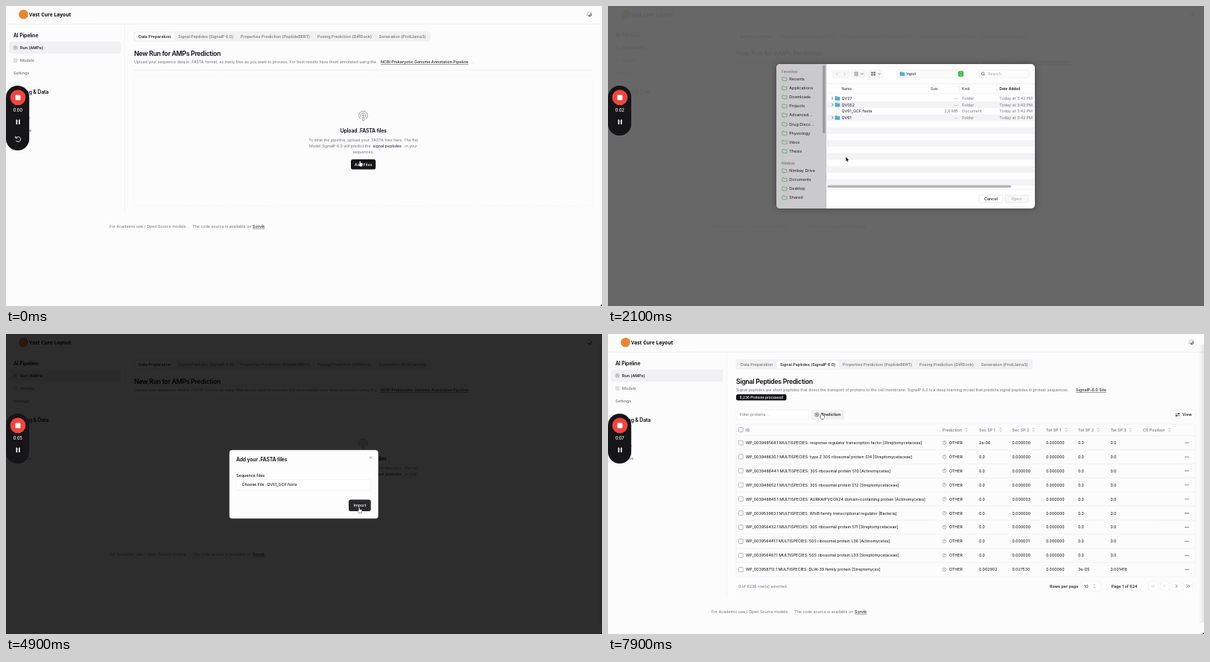
Recreate the animation shown at these times as an HTML page with a canvas. Size 800 by 403 pixels, loop 8000 ms.

```html
<!DOCTYPE html>
<html lang="en">
<head>
<meta charset="utf-8">
<title>Pipeline walkthrough</title>
<style>
html, body { margin: 0; width: 100%; height: 100%; overflow: hidden; background: #fdfcfd; }
canvas { display: block; width: 800px; height: 403px; }
</style>
</head>
<body>
<canvas id="stage"></canvas>
<script>
const W = 800, H = 403, LOOP = 8000;
const INK = '#0c0c0f', GRAY = '#71717a', LINE = '#e8e7ec', SOFT = '#f1f0f3', PAGE = '#fdfcfd';
const dpr = window.devicePixelRatio || 1;
const main = document.getElementById('stage');
const extra = document.createElement('canvas');
for (const c of [main, extra]) { c.width = W * dpr; c.height = H * dpr; }
const mainCtx = main.getContext('2d'), extraCtx = extra.getContext('2d');
let g = mainCtx;

const ramp = (t, a, b) => Math.min(1, Math.max(0, (t - a) / (b - a)));
const ease = p => p * p * (3 - 2 * p);

function text(s, x, y, color = INK, size = 5.3, weight = 400, align = 'left', spacing = 0, family = 'Inter') {
  g.font = `${weight} ${size}px ${family}, sans-serif`;
  g.letterSpacing = spacing + 'px';
  g.textAlign = align;
  g.fillStyle = color;
  g.fillText(s, x, y + size * 0.36);
  return g.measureText(s).width;
}
const medium = (s, x, y, color = INK, align = 'left') => text(s, x, y, color, 5.4, 500, align);
const heading = (s, x, y, align) => text(s, x, y, INK, 6.9, 600, align, -0.17);
function link(s, x, y) {
  const w = text(s, x, y, '#3f3f46', 5.3, 600);
  line([[x, y + 3.2], [x + w, y + 3.2]], '#3f3f46', 0.5);
}
function box(x, y, w, h, r, fill, stroke, lw = 0.5) {
  g.beginPath();
  g.roundRect(x, y, w, h, r);
  if (fill) { g.fillStyle = fill; g.fill(); }
  if (stroke) { g.strokeStyle = stroke; g.lineWidth = lw; g.stroke(); }
}
function line(pts, color = LINE, lw = 0.6) {
  g.beginPath();
  pts.forEach(([x, y]) => g.lineTo(x, y));
  g.strokeStyle = color;
  g.lineWidth = lw;
  g.stroke();
}
function arc(x, y, r, color, lw = 0.6, a = 0, b = Math.PI * 2) {
  g.beginPath();
  g.arc(x, y, r, a, b);
  g.strokeStyle = color;
  g.lineWidth = lw;
  g.stroke();
}
function disc(x, y, r, color) {
  g.beginPath();
  g.arc(x, y, r, 0, 7);
  g.fillStyle = color;
  g.fill();
}
function chevron(x, y, dx, dy, color, lw = 0.7) {
  line(dx ? [[x - dx, y - 2], [x + dx, y], [x - dx, y + 2]]
          : [[x - 1.5, y - dy], [x, y + dy], [x + 1.5, y - dy]], color, lw);
}
function sorter(x, y, color = GRAY) {
  chevron(x, y - 1.5, 0, -0.6, color, 0.5);
  chevron(x, y + 1.5, 0, 0.6, color, 0.5);
}
function layer(alpha, draw) {
  if (alpha <= 0) return;
  g = extraCtx;
  g.setTransform(dpr, 0, 0, dpr, 0, 0);
  g.clearRect(0, 0, W, H);
  draw();
  g = mainCtx;
  g.globalAlpha = alpha;
  g.drawImage(extra, 0, 0, W, H);
  g.globalAlpha = 1;
}
function veil(color, alpha) {
  if (alpha <= 0) return;
  g.globalAlpha = alpha;
  g.fillStyle = color;
  g.fillRect(0, 0, W, H);
  g.globalAlpha = 1;
}

const TABS = [
  ['Data Preparation', 178, 173, 226],
  ['Signal Peptides (SignalP 6.0)', 231, 226, 310],
  ['Properties Prediction (PeptideBERT)', 315],
  ['Posing Prediction (DiffDock)', 418],
  ['Generation (ProtLlama3)', 500.5]
];

function frameParts(t, tab) {
  g.fillStyle = PAGE;
  g.fillRect(0, 0, W, H);
  line([[0, 24.3], [W, 24.3]]);
  line([[159.3, 24], [159.3, tab ? 354 : 277]]);
  disc(23.5, 11.3, 6.3, '#e8862f');
  text('Vast Cure Layout', 31, 11.3, INK, 6.7, 600, 'left', 0, '"Noto Sans"');
  arc(783.5, 11.5, 2.3, INK, 0.8, -0.9, 2.6);
  arc(782, 10.5, 2.4, INK, 0.6, 0, 1.6);
  for (let a = 2.9; a < 5.4; a += 0.6)
    line([3, 3.9].map(r => [783.3 + r * Math.cos(a), 11.3 + r * Math.sin(a)]), INK, 0.6);

  heading('AI Pipeline', 10, 39.5);
  box(4, 48, 150.5, 16, 3, SOFT);
  arc(12.6, 56, 2.5, GRAY, 0.5);
  line([[11.9, 54.8], [13.9, 56], [11.9, 57.2], [11.9, 54.8]], GRAY, 0.5);
  medium('Run (AMPs)', 19, 56);
  box(10.2, 70.6, 5, 4.8, 0.5, '#e3e2e6', '#c9c8ce');
  medium('Models', 19, 73, GRAY);
  medium('Settings', 10, 90.3, GRAY);
  heading('Training & Data', 57, 116, 'right');
  medium('Datasets', 32, 150, GRAY, 'right');
  medium('Fine tune', 34.5, 167, GRAY, 'right');

  box(171.5, 34, 398.5, 14, 3, SOFT);
  TABS.forEach(([s, x, l, r], i) => {
    if (i === tab) box(l, 35.6, r - l, 10.8, 2.5, '#fff', '#e9e8ec', 0.3);
    medium(s, x, 41, i === tab ? INK : GRAY);
  });

  const fy = tab ? 373 : 296;
  text('For Academic use / Open Source models.', 139, fy, GRAY);
  text('The code source is available on', 250.3, fy, GRAY);
  link('Sorvik', 331, fy);
  if (t >= 600) {
    const sh = g.createLinearGradient(793, 0, 800, 0);
    sh.addColorStop(0, 'rgba(60,60,70,0)');
    sh.addColorStop(1, 'rgba(60,60,70,.12)');
    g.fillStyle = sh;
    g.fillRect(793, 14, 7, 374);
  }
  disc(799.5, 402.5, 1.3, '#333');
}

const title = s => text(s, 172, 63.5, INK, 8.75, 600, 'left', -0.3);

function uploadView(t) {
  title('New Run for AMPs Prediction');
  text('Upload your sequence data in .FASTA format, as many files as you want to process. For best results have them annotated using the', 172, 75.3, GRAY, 5.26);
  link('NCBI Prokaryotic Genome Annotation Pipeline', 503, 75.3);
  text('.', 626.3, 75.3, GRAY);
  line([[172, 86], [788, 86]], '#dfe0e6');
  g.setLineDash([1.2, 1.2]);
  box(171.5, 93, 616.5, 175.5, 3, null, '#ebeaef', 0.5);
  g.setLineDash([]);

  arc(479.5, 147, 5.8, GRAY, 0.7, 2.2, 7.22);
  arc(479.5, 147, 3.4, GRAY, 0.7, 2.4, 7.02);
  arc(479.5, 146.8, 1, GRAY, 0.7);
  box(478.4, 149.2, 2.2, 5, 1, null, GRAY, 0.7);
  heading('Upload .FASTA files', 479.7, 167.7, 'center');
  text('To strat the pipeline, upload your .FASTA files here. The fist', 479.6, 180.3, GRAY, 5.26, 400, 'center');
  text('Model SignalP 6.0 will predict the', 407, 188, GRAY, 5.26);
  text('signal peptides', 492.3, 188, '#52525b', 5.26, 600);
  text('in your', 552.3, 188, GRAY, 5.26, 400, 'right');
  text('sequences.', 479.6, 195.8, GRAY, 5.26, 400, 'center');
  const hover = t >= 200 && t < 1100;
  box(463, 206, 33.2, 13.6, 2.5, hover ? '#303033' : '#151518', t >= 5000 ? '#8fc08f' : null, 0.9);
  medium('Add Files', 479.6, 212.8, '#fafafa', 'center');
}

const COLS = [['Prediction', 449, 481], ['Sec SP 1', 498, 527], ['Sec SP 2', 542.5, 571], ['Tat SP 1', 588, 615],
  ['Tat SP 2', 631, 658], ['Tat SP 3', 674.5, 701], ['CS Position', 718, 753.5]];
const ROWS = [
  ['3948568.1', 'response regulator transcription factor [Streptomycetaceae]', '2e-06 0.000000 0.000000 0.0 0.0'],
  ['3948630.1', 'type Z 30S ribosomal protein S14 [Streptomycetaceae]', '0.0 0.000000 0.000000 0.0 0.0'],
  ['3948644.1', '30S ribosomal protein S10 [Actinomycetes]', '0.0 0.000000 0.000000 0.0 0.0'],
  ['3948652.1', '30S ribosomal protein S12 [Streptomycetaceae]', '0.0 0.000000 0.000000 0.0 0.0'],
  ['3948845.1', 'AURKAIP1/COX24 domain-containing protein [Actinomycetes]', '0.0 0.000003 0.000000 0.0 0.0'],
  ['3953983.1', 'WhiB family transcriptional regulator [Bacteria]', '0.0 0.000000 0.000000 0.0 0.0'],
  ['3956432.1', '30S ribosomal protein S11 [Streptomycetaceae]', '0.0 0.000000 0.000000 0.0 0.0'],
  ['3956441.1', '50S ribosomal protein L36 [Actinomycetes]', '0.0 0.000001 0.000000 0.0 0.0'],
  ['3956487.1', '50S ribosomal protein L33 [Streptomycetaceae]', '0.0 0.000000 0.000000 0.0 0.0'],
  ['3958712.1', 'DLW-39 family protein [Streptomyces]', '0.002902 0.027530 0.000060 3e-05 0.001418']
];

function tableView() {
  title('Signal Peptides Prediction');
  text('Signal peptides are short peptides that direct the transport of proteins to the cell membrane. SignalP 6.0 is a deep learning model that predicts signal peptides in protein sequences.', 172, 75.3, GRAY, 5.26);
  link('SignalP-6.0 Site', 628, 75.3);
  box(172, 81, 67.5, 8.2, 2.5, '#0c0c0f');
  text('6,236 Proteins processed', 205.8, 85.1, '#fafafa', 4.7, 600, 'center');

  box(172, 102, 97.5, 13, 2.5, '#fff', LINE);
  text('Filter proteins...', 177, 108.4, GRAY);
  box(272.5, 102, 45.5, 13, 2.5, SOFT);
  arc(280.3, 108.3, 2.5, INK, 0.5);
  line([[279, 108.3], [281.6, 108.3]], INK, 0.5);
  line([[280.3, 107], [280.3, 109.6]], INK, 0.5);
  medium('Prediction', 286.5, 108.4);
  box(756, 102, 32, 13, 2.5, '#fff', LINE);
  for (const [dy, x] of [[-1.3, 766], [1.3, 763]]) {
    line([[761.5, 108.4 + dy], [767.7, 108.4 + dy]], INK, 0.6);
    disc(x, 108.4 + dy, 0.9, INK);
  }
  medium('View', 771, 108.4);

  box(172, 121, 616, 205, 2.5, null, LINE);
  const check = y => box(175.3, y - 3, 6, 6, 1.2, '#fff', '#8b8b93', 0.6);
  check(128.5);
  medium('ID', 185, 128.6, GRAY);
  COLS.forEach(([s, x, sx]) => { medium(s, x, 128.6, GRAY); sorter(sx, 128.6); });
  ROWS.forEach(([id, name, vals], i) => {
    const y = 146 + 18.93 * i;
    line([[172, y - 9.5], [788, y - 9.5]]);
    check(y);
    text(`WP_00${id} MULTISPECIES: ${name}`, 185, y);
    arc(451.5, y, 2.4, GRAY, 0.5);
    text('?', 451.5, y, GRAY, 3.6, 500, 'center');
    text('OTHER', 458, y);
    vals.split(' ').forEach((v, k) => text(v, COLS[k + 1][1], y));
    for (const dx of [-2, 0, 2]) disc(777 + dx, y, 0.55, INK);
  });

  text('0 of 6236 row(s) selected.', 175, 338.7, GRAY);
  medium('Rows per page', 593, 338.7);
  box(634, 332.3, 27, 12.8, 2.5, '#fff', LINE);
  text('10', 639, 338.7);
  sorter(653, 338.7);
  medium('Page 1 of 624', 675.5, 338.7);
  [732, 747.5, 763, 778.5].forEach((x, i) => {
    const c = i < 2 ? '#a9a9b0' : INK, d = i < 2 ? -0.9 : 0.9;
    box(x - 6, 332.5, 12, 12.5, 2.5, '#fff', LINE);
    for (const off of i % 3 ? [0] : [-1.2, 1.2]) chevron(x + off, 338.7, d, 0, c, 0.6);
  });
}

function dialog(t, open) {
  const s = 0.95 + 0.05 * open;
  g.save();
  g.translate(399.7, 202 + 1.2 * (1 - open));
  g.scale(s, s);
  g.translate(-399.7, -202);
  box(300, 156, 199.5, 91.8, 3.5, '#fdfdfd', '#dddce0', 0.4);
  heading('Add your .FASTA files', 309, 169);
  line([[488, 164.3], [491, 167.3]], GRAY);
  line([[491, 164.3], [488, 167.3]], GRAY);
  medium('Sequence files', 309, 190);
  box(309, 195.5, 181, 14.3, 2.5, '#fff', LINE);
  medium('Choose File', 316.5, 202.3);
  const chosen = t >= 3600;
  text(chosen ? 'QV61_GCF.fasta' : 'No file chosen', 350.3, 202.3, chosen ? INK : '#3f3f46', 5.35);
  box(460, 222.5, 29.7, 15.5, 2.5, t >= 4200 ? '#29282b' : '#18181b');
  medium('Import', 474.9, 230.2, '#fafafa', 'center');
  g.restore();
}

function folder(x, y, fill, stroke) {
  g.beginPath();
  [[-3, -2.4], [-0.7, -2.4], [0, -1.6], [3, -1.6], [3, 2.4], [-3, 2.4]].forEach(([a, b]) => g.lineTo(x + a, y + b));
  g.closePath();
  if (fill) { g.fillStyle = fill; g.fill(); }
  g.strokeStyle = stroke;
  g.lineWidth = 0.6;
  g.stroke();
}

const FAVORITES = ['Recents', 'Applications', 'Downloads', 'Projects', 'Advanced...', 'Drug Disco...', 'Physiology', 'Inbox', 'Thesis'];
const CLOUD = ['Nimbay Drive', 'Documents', 'Desktop', 'Shared'];
const FILES = ['QV14'.replace('14', '27'), 'QV052', 'QV61_GCF.fasta', 'QV61'];

function picker(t, dy) {
  const active = t < 3180, picked = t >= 2800;
  const green = active ? '#3c9f45' : '#85858a';
  const ui = (s, x, y, color = '#1d1d20', weight = 400, align = 'left') => text(s, x, y, color, 5.45, weight, align);
  g.save();
  g.translate(0, dy);
  g.shadowColor = 'rgba(0,0,0,.35)';
  g.shadowBlur = 8 * dpr;
  box(226, 78, 347, 194, 5, '#fefefe');
  g.shadowColor = 'transparent';
  box(226, 78, 67, 194, [5, 0, 0, 5], '#cac9cc');
  line([[293, 78], [293, 272]], '#b9b8bc', 0.5);
  box(288.2, 79.5, 3.3, 91.5, 1.6, '#98979a');

  text('Favorites', 233, 88.3, '#7b7a7e', 4.8, 600);
  text('Nimbay', 233, 211.5, '#7b7a7e', 4.8, 600);
  const place = (s, y) => { folder(237, y, null, green); ui(s, 243.3, y); };
  FAVORITES.forEach((s, i) => place(s, 98 + 12.13 * i));
  CLOUD.forEach((s, i) => place(s, 221.2 + 12.1 * i));

  box(301.5, 86, 22, 10.3, 2, '#f7f7f8', '#e2e2e5', 0.4);
  chevron(307.5, 91.2, -0.9, 0, '#b5b5b9');
  chevron(317.5, 91.2, 0.9, 0, '#b5b5b9');
  box(326.5, 86, 19.5, 10.3, 2, '#f7f7f8', '#e2e2e5', 0.4);
  box(349.5, 86, 19.5, 10.3, 2, '#f7f7f8', '#e2e2e5', 0.4);
  for (const y of [89.2, 91.2, 93.2]) line([[330.5, y], [335.8, y]], '#4a4a4e', 0.7);
  for (const y of [88.6, 91.4]) for (const x of [353.3, 356.6]) box(x, y, 2.4, 2, 0.3, '#5a5a5e');
  chevron(341.3, 91.2, 0, 0.8, '#4a4a4e');
  chevron(364.3, 91.2, 0, 0.8, '#4a4a4e');
  box(388, 86, 91, 10.3, 2.3, '#fafafa', '#dcdcdf', 0.5);
  folder(395, 91.2, '#4fb3cf', '#3a9cba');
  ui('Input', 400.3, 91);
  if (active) box(470, 87.3, 7.2, 7.8, 1.8, '#42b848');
  sorter(473.6, 91.2, active ? '#fff' : '#333');
  box(498, 86, 67, 10.3, 2.3, '#fcfcfc', '#e0e0e3', 0.5);
  arc(503.2, 90.7, 1.8, '#4a4a4e', 0.7);
  line([[504.5, 92], [506, 93.6]], '#4a4a4e', 0.7);
  ui('Search', 509.8, 91.2, '#a3a3a8');

  line([[293, 104.5], [573, 104.5]], '#e0e0e3', 0.5);
  line([[293, 117.3], [573, 117.3]], '#e6e6e9', 0.5);
  [430, 472, 522].forEach(x => line([[x, 107], [x, 115.5]], '#dcdcdf', 0.5));
  [['Name', 313.5], ['Size', 433], ['Kind', 475]].forEach(([s, x]) => text(s, x, 111, '#4a4a4e', 4.9, 500));
  text('Date Added', 525.5, 111, '#1d1d20', 4.9, 600);

  const step = 8.68;
  for (let i = 1; i < 14; i += 2) {
    g.fillStyle = '#f3f3f5';
    g.fillRect(293.3, 119.7 + step * i, 279.7, step);
  }
  FILES.forEach((s, i) => {
    const y = 124 + step * i, doc = i === 2, lit = doc && picked;
    if (lit) {
      g.fillStyle = active ? '#3fa548' : '#d2d1d4';
      g.fillRect(293.3, y - step / 2, 279.7, step);
    }
    const ink = lit && active ? '#fff' : '#1d1d20', dim = lit && active ? '#fff' : '#77777c';
    if (doc) box(306, y - 3, 4.4, 6, 0.4, '#fff', '#d5d5d8', 0.4);
    else { chevron(301.3, y, 0.8, 0, '#4a4a4e', 0.7); folder(308, y, '#4fb3cf', '#3a9cba'); }
    ui(s, 313.5, y, ink);
    ui(doc ? '2,6 MB' : '--', 469.5, y, dim, 400, 'right');
    ui(doc ? 'Document' : 'Folder', 475.3, y, dim);
    ui('Today at 3:42\u2009PM', 525.3, y, dim);
  });
  box(294.5, 240.7, 246.5, 3.4, 1.7, '#b4b3b6');
  line([[293, 246.5], [573, 246.5]], '#e6e6e9', 0.5);
  box(498, 254, 32, 10, 2.3, '#fff', '#dcdcdf', 0.6);
  ui('Cancel', 514, 259, '#1d1d20', 500, 'center');
  box(533, 254, 31.5, 10, 2.3, picked ? '#fff' : '#f8f8f9', '#e3e3e6', 0.6);
  ui('Open', 548.5, 259, picked ? '#1d1d20' : '#aaaab0', 500, 'center');
  g.restore();
}

function recorder(t) {
  box(0, 107, 31.2, t < 200 ? 87 : 67, 15.6, '#161517');
  disc(16, 122.8, 10.4, '#f6433b');
  box(12.5, 119.4, 7, 7, 1.2, '#fff');
  text('0:0' + Math.floor((t + 400) / 1050), 15.8, 140.5, '#fff', 5.5, 500, 'center');
  box(13.6, 152.6, 1.7, 6.4, 0.6, '#fff');
  box(17, 152.6, 1.7, 6.4, 0.6, '#fff');
  if (t < 200) {
    arc(16.2, 179, 3.4, '#fff', 0.9, -2.5, 2.6);
    line([[12.6, 174.8], [12.9, 177.4], [15.4, 177.3]], '#fff', 0.9);
  }
}

const PATH = [[0, 476, 212], [100, 476, 212], [300, 483, 218], [1000, 483, 218], [1500, 332, 203], [1750, 332, 203],
  [2050, 321, 206], [2150, 321, 206], [2700, 365, 141], [3500, 365, 141], [4300, 475, 237], [4900, 475, 237],
  [5600, 264, 62], [6000, 253.5, 45.5], [6600, 253.5, 45.5], [7000, 350, 181], [7200, 350, 181], [7900, 287.5, 110.5]];
const HAND = [[0, 1000], [4200, 5000], [5700, 6700], [7700, 8000]];

function pointer(t) {
  const i = Math.max(1, PATH.findIndex(k => k[0] >= t));
  const [a, x0, y0] = PATH[i - 1], [b, x1, y1] = PATH[i];
  const p = ease(ramp(t, a, b));
  g.save();
  g.translate(x0 + (x1 - x0) * p, y0 + (y1 - y0) * p);
  const hand = HAND.some(([s, e]) => t >= s && t < e);
  const shape = hand
    ? [[-1.4, -3.8], [-0.4, -3.8], [-0.2, -1.3], [2.4, -0.8], [2.8, 0.2], [2, 3.6], [-1.1, 3.6], [-2.9, 0.6], [-2.3, 0.1], [-1.4, 0.9]]
    : [[-1.6, -3.2], [-1.6, 2.4], [-0.4, 1.4], [0.5, 3.3], [1.4, 2.9], [0.6, 1.1], [2.2, 1]];
  g.beginPath();
  shape.forEach(([x, y]) => g.lineTo(x, y));
  g.closePath();
  g.lineJoin = 'round';
  g.lineWidth = hand ? 0.8 : 1.1;
  g.strokeStyle = hand ? '#111' : '#fff';
  g.stroke();
  g.fillStyle = hand ? '#fff' : '#111';
  g.fill();
  g.restore();
}

function draw(t) {
  g = mainCtx;
  g.setTransform(dpr, 0, 0, dpr, 0, 0);
  const tab = t >= 6300 ? 1 : 0;
  frameParts(t, tab);
  if (tab) tableView(); else uploadView(t);

  const open = ramp(t, 870, 1100) - ramp(t, 4900, 5130);
  veil('#000', 0.82 * open);
  layer(open, () => dialog(t, open));
  veil('#7d7b7d', 0.75 * (ramp(t, 1700, 1950) - ramp(t, 3200, 3500)));
  const shown = ramp(t, 1700, 1900) - ramp(t, 3180, 3400);
  layer(shown, () => picker(t, -7.3 * (1 - shown)));
  recorder(t);
  pointer(t);
}

const start = performance.now();
function tick() {
  const t = (performance.now() - start) % LOOP;
  draw(Math.floor(t / 100) * 100);
  requestAnimationFrame(tick);
}
tick();
</script>
</body>
</html>
```
